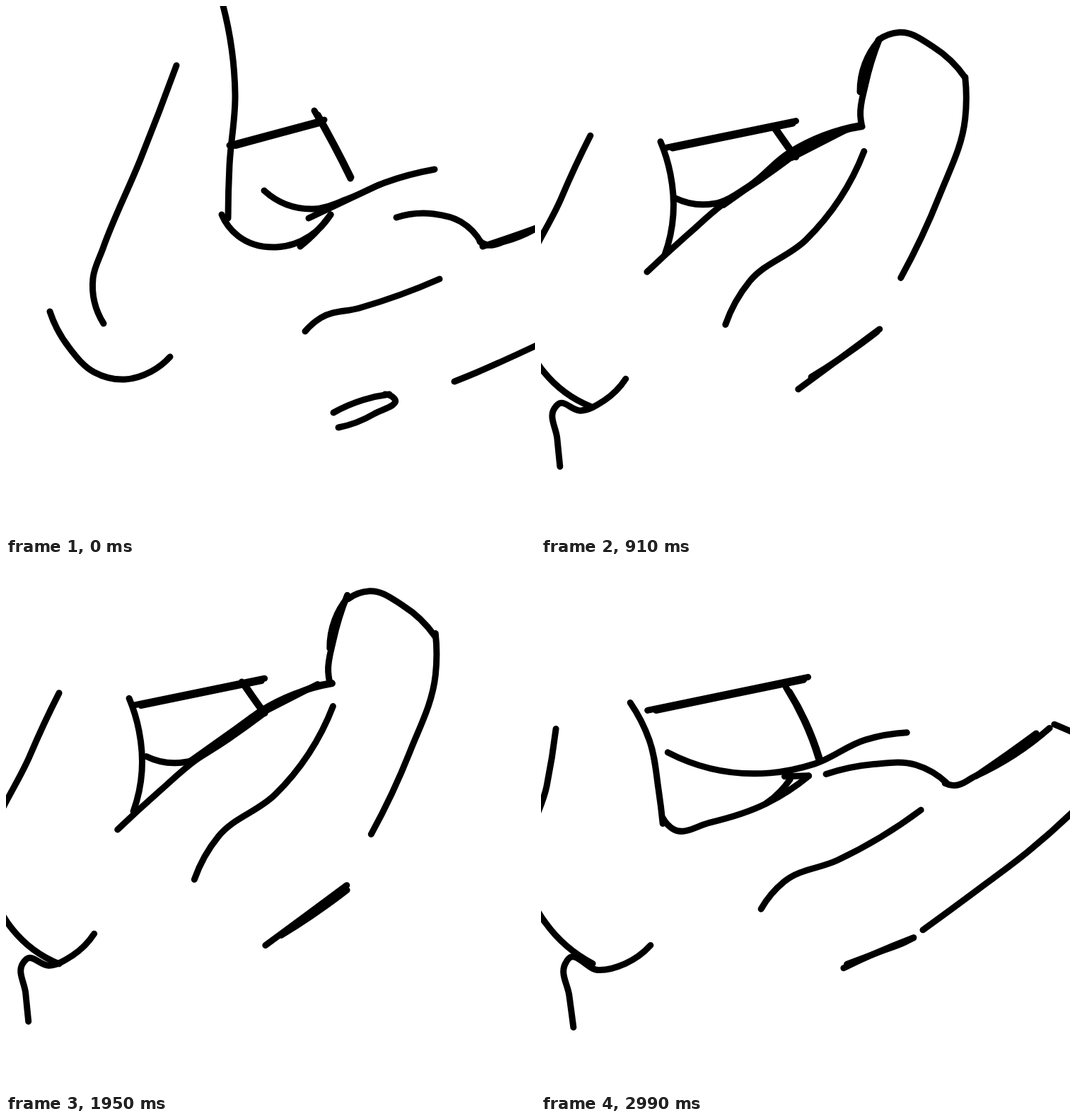
These frames come from a looping animation (748 by 748 pixels, 3.12 s). An HTML page with a canvas:

```html
<!DOCTYPE html>
<html lang="en">
<head>
<meta charset="utf-8">
<title>Line drawing</title>
<style>
html, body { margin: 0; width: 100%; height: 100%; overflow: hidden; background: #fff; }
canvas { display: block; width: 748px; height: 748px; }
</style>
</head>
<body>
<canvas id="stage" width="748" height="748"></canvas>
<script>
const STEP = 130, COUNT = 24, FOLDED = 6, UNFOLD = 20;

// A few guide points per brush stroke: open | half folded | folded.
const strokes = {
  leg: '241,84 190,217 137,343 123,385 138,449 | 21,234 8,315 -25,440 6,508 73,566 | 74,182 33,270 -26,440 8,516 74,565',
  hook: `62,432 72,456 90,484 125,518 168,528 205,517 232,496
    | 45,657 39,612 33,568 38,560 80,576 118,567 154,541
    | 31,650 27,610 23,568 28,562 60,571 93,557 124,526`,
  side: '306,-4 324,125 316,225 314,300 | 127,197 154,250 167,320 173,368 | 174,192 188,238 192,295 180,352',
  bowl: '305,295 328,325 382,341 430,325 459,295 | 172,362 186,377 238,368 318,341 378,302 | 157,376 216,322 266,279 315,247 365,211',
  bowlTail: '416,340 436,322 459,295 | 318,340 338,323 352,306 | 262,280 300,253 350,217',
  torso: '365,261 435,287 485,272 535,250 606,231 | 180,267 325,296 388,283 460,249 518,239 | 197,273 252,281 300,257 358,209 460,170',
  rib: '428,300 527,253 | 344,302 378,301 | 360,214 440,173',
  band: '316,197 450,161 | 150,209 377,162 | 180,200 365,162',
  strap: '436,148 462,195 487,244 | 347,176 372,222 393,277 | 335,168 348,187 366,212',
  shoulder: '552,299 605,294 643,305 672,335 | 403,299 470,285 530,286 574,312 | 362,211 405,189 430,178 460,171',
  innerArm: '670,333 681,338 705,333 752,313 | 572,311 583,314 615,301 720,233 | 458,170 456,155 463,112 483,47',
  wrist: '674,340 710,328 752,313 | 615,301 660,270 700,241 | 458,120 465,80 483,49',
  arch: '760,250 790,260 830,280 820,300 | 726,229 752,240 820,270 820,300 | 483,49 513,38 560,58 606,102',
  forearm: '752,479 700,503 666,518 634,531 | 752,353 690,408 620,461 541,519 | 606,101 606,160 570,268 515,385',
  underarm: '423,460 445,441 500,427 613,386 | 312,489 345,450 420,420 538,349 | 266,449 300,388 380,329 462,204',
  bellyTop: '463,575 505,557 542,549 | 427,573 470,553 526,530 | 368,541 425,499 483,456',
  bellyBottom: '536,549 549,555 520,577 470,596 | 526,531 514,537 480,550 432,568 | 481,461 468,471 430,498 388,525'
};
const bold = ['band', 'strap'];

const parse = text => text.split('|').map(pose =>
  pose.trim().split(/\s+/).map(p => p.split(',').map(Number)));
const parts = Object.entries(strokes).map(([name, text]) => ({ name, poses: parse(text) }));

const ctx = document.getElementById('stage').getContext('2d');
ctx.lineWidth = 9;
ctx.lineCap = ctx.lineJoin = 'round';

const noise = seed => {
  const x = Math.sin(seed * 127.1) * 43758.5453;
  return x - Math.floor(x) - 0.5;
};

// 0 open, 1 half, 2 folded: a fast fold that settles, then an accelerating release.
function foldAt(step) {
  if (step < FOLDED) return 2 - 2 * (1 - step / FOLDED) ** 1.62;
  if (step <= UNFOLD) return 2;
  return 2 - 2 * ((step - UNFOLD) / (COUNT - UNFOLD)) ** 2.41;
}

// The body swings a little too far after folding, then returns.
const recoilAt = step =>
  step > FOLDED && step < 2 * FOLDED ? -11 * Math.sin(Math.PI * (step - FOLDED) / FOLDED) : 0;

// Smooth curve: tangents lean towards the shorter neighbour, ends continue the arc.
function drawCurve(pts) {
  const segs = pts.slice(1).map(([x, y], i) => {
    const dx = x - pts[i][0], dy = y - pts[i][1], len = Math.hypot(dx, dy) || 1;
    return { x: dx / len, y: dy / len, len };
  });
  const mirror = (t, s) => {
    const dot = 2 * (t.x * s.x + t.y * s.y);
    return { x: dot * s.x - t.x, y: dot * s.y - t.y };
  };
  const inner = segs.slice(1).map((b, i) => {
    const a = segs[i], x = a.x * b.len + b.x * a.len, y = a.y * b.len + b.y * a.len;
    const len = Math.hypot(x, y) || 1;
    return { x: x / len, y: y / len };
  });
  const first = segs[0], last = segs.at(-1);
  const tangents = [mirror(inner[0] || first, first), ...inner, mirror(inner.at(-1) || last, last)];

  ctx.beginPath();
  ctx.moveTo(...pts[0]);
  segs.forEach(({ len }, i) => {
    const [ax, ay] = pts[i], [bx, by] = pts[i + 1], u = tangents[i], v = tangents[i + 1], h = len * 0.35;
    ctx.bezierCurveTo(ax + u.x * h, ay + u.y * h, bx - v.x * h, by - v.y * h, bx, by);
  });
  ctx.stroke();
}

// A second, slightly shorter pass beside the first.
function drawDouble(pts) {
  const [ax, ay] = pts[0], [bx, by] = pts.at(-1), cx = (ax + bx) / 2, cy = (ay + by) / 2;
  drawCurve(pts.map(([x, y]) => [cx + (x - cx) * 0.92 + 3, cy + (y - cy) * 0.92 + 2]));
}

function draw() {
  const step = Math.floor(performance.now() / STEP) % COUNT;
  const fold = foldAt(step), from = Math.min(1, Math.floor(fold)), t = fold - from;
  const recoil = recoilAt(step);
  ctx.fillStyle = '#fff';
  ctx.fillRect(0, 0, 748, 748);
  parts.forEach(({ name, poses }, n) => {
    if (name === 'arch' && step < FOLDED) return;
    const dx = recoil + noise(step * 31 + n) * 2 * fold, dy = noise(step * 17 + n + 0.5) * 2 * fold;
    const pts = poses[from].map(([x, y], i) => {
      const [tx, ty] = poses[from + 1][i];
      return [x + (tx - x) * t + dx, y + (ty - y) * t + dy];
    });
    drawCurve(pts);
    if (bold.includes(name)) drawDouble(pts);
  });
  requestAnimationFrame(draw);
}
draw();
</script>
</body>
</html>
```
